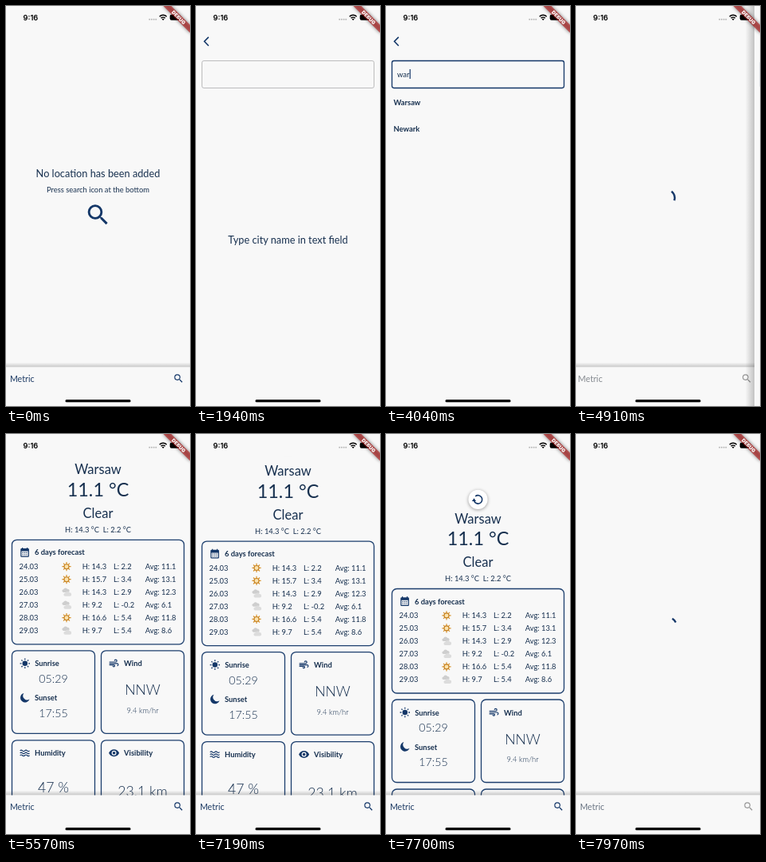
Animation of 231x500 px, one loop 8 s. Source, as an HTML page:

```html
<!DOCTYPE html>
<html lang="en">
<head>
<meta charset="utf-8">
<title>Weather app</title>
<style>
  html, body { margin: 0; width: 100%; height: 100%; overflow: hidden; background: #f8f8f8; }
  svg { display: block; width: 100%; height: 100%; }
  text { font-family: Lato, sans-serif; font-size: 9.4px; fill: #17304f; white-space: pre; }
  .mid { text-anchor: middle; }
  .bold { font-weight: 700; }
  .light { font-weight: 300; }
  .s18 { font-size: 10.66px; }
  .s22 { font-size: 12.75px; }
  .s24 { font-size: 14.2px; }
  .s28 { font-size: 16.5px; }
  .s30 { font-size: 17.7px; }
  .s40 { font-size: 23.4px; }
  .icon { fill: #143768; }
  .line { fill: none; stroke: #143768; }
  .card { fill: none; stroke: #1d3f6e; stroke-width: 1.3; }
</style>
</head>
<body>
<svg viewBox="0 0 231 500" preserveAspectRatio="none">
  <defs>
    <linearGradient id="edge"><stop offset="0" stop-opacity="0"/><stop offset="1" stop-opacity=".22"/></linearGradient>
    <linearGradient id="rise" x2="0" y2="1"><stop offset="0" stop-opacity="0"/><stop offset="1" stop-opacity=".2"/></linearGradient>
    <filter id="blur" x="-50%" y="-100%" width="200%" height="300%"><feGaussianBlur stdDeviation="1.9"/></filter>
    <clipPath id="body"><rect y="28" width="231" height="423"/></clipPath>
    <path id="search" d="M15.5 14h-.79l-.28-.27A6.47 6.47 0 0 0 16 9.5 6.5 6.5 0 1 0 9.5 16c1.61 0 3.09-.59 4.23-1.57l.27.28v.79l5 4.99L20.49 19zm-6 0a4.5 4.5 0 1 1 0-9 4.5 4.5 0 0 1 0 9z"/>
    <path id="calendar" fill-rule="evenodd" d="M19 4h-1V2h-2v2H8V2H6v2H5a2 2 0 0 0-2 2v14a2 2 0 0 0 2 2h14a2 2 0 0 0 2-2V6a2 2 0 0 0-2-2zm0 16H5V10h14zM7 12h2v2H7zm4 0h2v2h-2zm4 0h2v2h-2zM7 16h2v2H7zm4 0h2v2h-2zm4 0h2v2h-2z"/>
    <path id="wind" d="M14.5 17a3 3 0 0 1-6 0h2a1 1 0 1 0 1-1H2v-2h9.5a3 3 0 0 1 3 3zM19 6.5a3.5 3.5 0 0 0-7 0h2A1.5 1.5 0 1 1 15.5 8H2v2h13.5A3.5 3.5 0 0 0 19 6.5zM18.5 11H2v2h16.5a1.5 1.5 0 0 1 0 3v2a3.5 3.5 0 0 0 0-7z"/>
    <path id="eye" fill-rule="evenodd" d="M12 4.5C7 4.5 2.7 7.6 1 12c1.7 4.4 6 7.5 11 7.5s9.3-3.1 11-7.5c-1.7-4.4-6-7.5-11-7.5zM12 17a5 5 0 1 1 0-10 5 5 0 0 1 0 10zm0-8a3 3 0 1 0 0 6 3 3 0 0 0 0-6z"/>
    <path id="waves" fill="none" stroke="#143768" stroke-width="2" d="M2 7q2.5-2.5 5 0t5 0 5 0 5 0M2 12q2.5-2.5 5 0t5 0 5 0 5 0M2 17q2.5-2.5 5 0t5 0 5 0 5 0"/>
    <path id="moon" d="M10 2A10 10 0 1 0 22 15 9 9 0 0 1 10 2z"/>
    <g id="sun"><circle cx="12" cy="12" r="5.5"/><path stroke="#143768" stroke-width="2.2" d="M12 1.5v3M12 19.5v3M1.5 12h3M19.5 12h3M4.6 4.6l2 2M17.4 17.4l2 2M4.6 19.4l2-2M17.4 6.6l2-2"/></g>
    <g id="clear">
      <path fill="none" stroke="#d9932c" stroke-width="1.2" d="M0-5.6V5.6M-5.6 0H5.6M-4-4L4 4M-4 4L4-4"/>
      <circle r="3" fill="#fbe3ae" stroke="#c5801f" stroke-width="1.1"/>
    </g>
    <g id="cloud">
      <path fill="#cecece" d="M-3.8.2a1.8 1.8 0 0 1 0-3.6 2.7 2.7 0 0 1 5-.4A2 2 0 0 1 2 .2z"/>
      <path fill="#dcdcdc" d="M-1.6 5a2 2 0 0 1 0-4 3 3 0 0 1 5.500-.4A2.200 2.200 0 0 1 4 5z"/>
    </g>
  </defs>

  <g id="home">
    <rect width="231" height="500" fill="#f8f8f8"/>
    <g id="empty">
      <text class="mid s22" x="115.5" y="214">No location has been added</text>
      <text class="mid" x="115.5" y="233">Press search icon at the bottom</text>
      <use href="#search" class="icon" transform="translate(98.4 243.9) scale(1.43)"/>
    </g>
    <g id="weather"></g>
    <g clip-path="url(#body)">
      <g id="refresh">
        <circle r="12" cy="1" opacity=".4" filter="url(#blur)"/>
        <circle r="12.1" fill="#fff"/>
        <g id="arrow">
          <path class="line" stroke-width="1.6" d="M-3.3-4A5.2 5.2 0 1 1-5 1.4"/>
          <path class="icon" d="M-7.6 2.2h5.2L-5-1.5z"/>
        </g>
      </g>
    </g>
    <path id="homeSpinner" class="line" stroke-width="2.4"/>
    <rect y="445.5" width="231" height="6" fill="url(#rise)"/>
    <rect y="451.5" width="231" height="48.5" fill="#f8f8f8"/>
    <text id="metric" class="s18" x="4.9" y="469.5">Metric</text>
    <use id="barSearch" href="#search" transform="translate(209.5 458.5) scale(.592)"/>
  </g>

  <g id="page">
    <rect id="edgeShadow" x="-11.5" width="11.5" height="500" fill="url(#edge)"/>
    <rect width="231" height="500" fill="#f8f8f8"/>
    <path class="line" stroke-width="1.6" d="M15.8 38.9L10.5 44.3l5.3 5.4"/>
    <rect id="field" x="7.5" y="68.5" width="216" height="34" rx="2.4" fill="none"/>
    <text id="query" x="14" y="89"></text>
    <rect id="cursor" y="79" width="1.2" height="12" fill="#143768"/>
    <text id="hint" class="mid s22" x="115.5" y="296.5">Type city name in text field</text>
    <g id="results"></g>
    <path id="pageSpinner" class="line" stroke-width="2.4"/>
  </g>

  <g>
    <text x="21.5" y="18" style="font:600 9.3px Inter,sans-serif;fill:#000">9:16</text>
    <g fill="#b9b9b9"><circle cx="180.2" cy="16.7" r="1"/><circle cx="182.9" cy="16.7" r="1"/><circle cx="185.6" cy="16.7" r="1"/><circle cx="188.3" cy="16.7" r="1"/></g>
    <path fill="none" stroke="#000" stroke-width="1.5" d="M192.7 13.2a6.3 6.3 0 0 1 9 0M194.6 15.3a3.7 3.7 0 0 1 5.2 0"/>
    <path d="M195.7 16.5a2.2 2.2 0 0 1 3 0l-1.5 1.6z"/>
    <rect x="205.7" y="10.8" width="13" height="7" rx="2"/>
    <g transform="translate(231 0) rotate(45)">
      <rect x="-24" y="16.6" width="48" height="7.1" opacity=".5" filter="url(#blur)"/>
      <rect x="-24" y="16.6" width="48" height="7.1" fill="#b71c1c" opacity=".63"/>
      <text class="mid" y="22.4" style="font:900 6.2px Inter,sans-serif;fill:#fff">DEBUG</text>
    </g>
    <rect x="74.5" y="492.1" width="82" height="3.1" rx="1.5"/>
  </g>
</svg>
<script>
const LOOP = 8000;
const $ = id => document.getElementById(id);
const clamp = v => Math.max(0, Math.min(1, v));
const span = (t, from, length) => clamp((t - from) / length);
const show = (id, on) => $(id).style.display = on ? '' : 'none';
const move = (id, x, y = 0) => $(id).setAttribute('transform', `translate(${x} ${y})`);

function bezier(x1, y1, x2, y2) {
  const at = (a, b, s) => 3 * a * (1 - s) ** 2 * s + 3 * b * (1 - s) * s * s + s ** 3;
  return x => {
    if (x <= 0 || x >= 1) return clamp(x);
    let lo = 0, hi = 1;
    for (let i = 0; i < 24; i++) {
      const mid = (lo + hi) / 2;
      if (at(x1, x2, mid) < x) lo = mid; else hi = mid;
    }
    return at(y1, y2, hi);
  };
}
const slideEase = bezier(.35, .91, .33, .97);
const standardEase = bezier(.4, 0, .2, 1);
const dragEase = bezier(.35, .1, .4, 1);

// Static weather content
const text = (x, y, label, cls = '') => `<text x="${x}" y="${y}" class="${cls}">${label}</text>`;
const icon = (name, cx, cy) =>
  `<use href="#${name}" class="icon" transform="translate(${cx - 7.1} ${cy - 7.1}) scale(.592)"/>`;
const card = (x, y, w, h) => `<rect class="card" x="${x}" y="${y}" width="${w}" height="${h}" rx="6"/>`;
const heading = (name, x, y, label) => icon(name, x, y) + text(x + 12.4, y + 3.5, label, 'bold');
const forecast = [
  ['24.03', 'clear', 14.3, 2.2, 11.1], ['25.03', 'clear', 15.7, 3.4, 13.1],
  ['26.03', 'cloud', 14.3, 2.9, 12.3], ['27.03', 'cloud', 9.2, -0.2, 6.1],
  ['28.03', 'clear', 16.6, 5.4, 11.8], ['29.03', 'cloud', 9.7, 5.4, 8.6]
];
$('weather').innerHTML =
  text(115.5, 51.5, 'Warsaw', 'mid s28') + text(115.5, 79.3, '11.1 °C', 'mid s40') +
  text(115.5, 106, 'Clear', 'mid s28') + text(115.5, 124, 'H: 14.3 °C  L: 2.2 °C', 'mid') +
  card(7.5, 133.5, 216, 130.5) + heading('calendar', 23.6, 149, '6 days forecast') +
  forecast.map(([date, sky, high, low, avg], i) => {
    const y = 170.4 + 16 * i;
    return text(16.5, y, date) + `<use href="#${sky}" x="76" y="${y - 3.5}"/>` +
      text(95.7, y, `H: ${high}`) + text(135, y, `L: ${low}`) + text(174.7, y, `Avg: ${avg}`);
  }).join('') +
  [7.5, 119.5].map(x => card(x, 272, 104, 103.5) + card(x, 384, 104, 103.5)).join('') +
  heading('sun', 23.8, 288, 'Sunrise') + text(59.5, 312, '05:29', 'mid light s24') +
  heading('moon', 23.6, 331, 'Sunset') + text(59.5, 355, '17:55', 'mid light s24') +
  heading('wind', 135.6, 288, 'Wind') + text(171.5, 327.5, 'NNW', 'mid light s30') +
  text(171.5, 350.3, '9.4 km/hr', 'mid light') +
  heading('waves', 23.6, 400, 'Humidity') + text(59.5, 449.5, '47 %', 'mid light s30') +
  heading('eye', 135.6, 400, 'Visibility') + text(171.5, 454, '23.1 km', 'mid light s30');

// Indeterminate ring: head and tail chase each other while the whole arc rotates
function spinner(id, age, cx, cy) {
  show(id, age >= 0);
  if (age < 0) return;
  const phase = age / 1333 % 1;
  const head = standardEase(clamp(phase * 2)), tail = standardEase(clamp(phase * 2 - 1));
  const start = Math.PI * (-.5 + 1.5 * tail + 2 * age / 2222 + .5 * phase);
  const sweep = Math.max(1.5 * Math.PI * (head - tail), .01);
  const point = a => `${cx + 10.7 * Math.cos(a)} ${cy + 10.7 * Math.sin(a)}`;
  $(id).setAttribute('d', `M${point(start)}A10.7 10.7 0 ${+(sweep > Math.PI)} 1 ${point(start + sweep)}`);
}

const cities = ['Warsaw', 'Washington', 'Wakefield', 'Walsall', 'Waterloo', 'Warwick',
  'Ottawa', 'Newark', 'Wellington', 'Wichita', 'Wrocław'];
const typed = [[2450, 'w'], [2750, 'wa'], [3380, 'war']];
const searches = [
  { start: 2750, end: 2960, rows: cities },
  { start: 3060, end: 3290, rows: cities.slice(0, 8) },
  { start: 3620, end: 3830, rows: ['Warsaw', 'Newark'] }
];
const noRows = [];
const mixColor = (a, b, k) => `rgb(${a.map((v, i) => v + (b[i] - v) * k)})`;
const GRAY = [150, 150, 150], NAVY = [20, 55, 104], INK = [29, 59, 100];

let shownRows = noRows;
function drawSearch(t, x) {
  move('page', 231 * x);
  show('page', x < 1);
  const focus = span(t, 1940, 200);
  $('field').setAttribute('stroke', mixColor([165, 165, 165], NAVY, focus));
  $('field').setAttribute('stroke-width', .7 + .6 * focus);

  const query = (typed.findLast(([at]) => t >= at) || [0, ''])[1];
  $('query').textContent = query;
  $('cursor').setAttribute('x', 14.2 + (query && x < 1 ? $('query').getComputedTextLength() : 0));
  $('cursor').setAttribute('opacity', span(t, 1945, 60) * (1 - span(t, 4040, 240)));

  const current = searches.findLast(s => t >= s.start);
  show('hint', !current);
  const loading = current && t < current.end;
  spinner('pageSpinner', loading ? t - current.start : -1, 115.5, 292);
  const rows = current && !loading ? current.rows : noRows;
  if (rows !== shownRows) {
    $('results').innerHTML = rows.map((city, i) => text(9.5, 123.5 + 33 * i, city, 'bold')).join('');
    shownRows = rows;
  }
}

function drawHome(t, x) {
  move('home', -77 * (1 - x));
  const loadStart = t >= 7840 ? 7840 : 4740;
  const loaded = t >= 5400 && t < 7840;
  const loading = t >= 4740 && !loaded;
  show('empty', t < 4740);
  show('weather', loaded);
  spinner('homeSpinner', loading ? t - loadStart : -1, 115.5, 240);

  const disabled = loading ? span(t, loadStart, 200) : t >= 5400 ? 1 - span(t, 5400, 180) : 0;
  $('metric').style.fill = mixColor(INK, GRAY, disabled);
  $('barSearch').style.fill = mixColor(NAVY, GRAY, +loading);

  const drag = dragEase(span(t, 7175, 365));
  const release = 1 - (1 - span(t, 7650, 330)) ** 3;
  move('weather', 0, 101.3 * drag * (1 - release) - 1.2);
  const reach = 1.45 * drag - .45 * span(t, 7650, 150);
  show('refresh', loaded && drag > 0);
  move('refresh', 115.5, 13.5 + 52.7 * reach);
  $('refresh').setAttribute('opacity', clamp(reach * 1.5));
  $('arrow').setAttribute('transform', `rotate(${(drag - 1) * 200})`);
}

function frame() {
  const t = performance.now() % LOOP;
  const x = t < 2500 ? 1 - slideEase(span(t, 485, 495)) : slideEase(span(t, 4580, 500));
  drawHome(t, x);
  drawSearch(t, x);
  requestAnimationFrame(frame);
}
frame();
</script>
</body>
</html>
```
